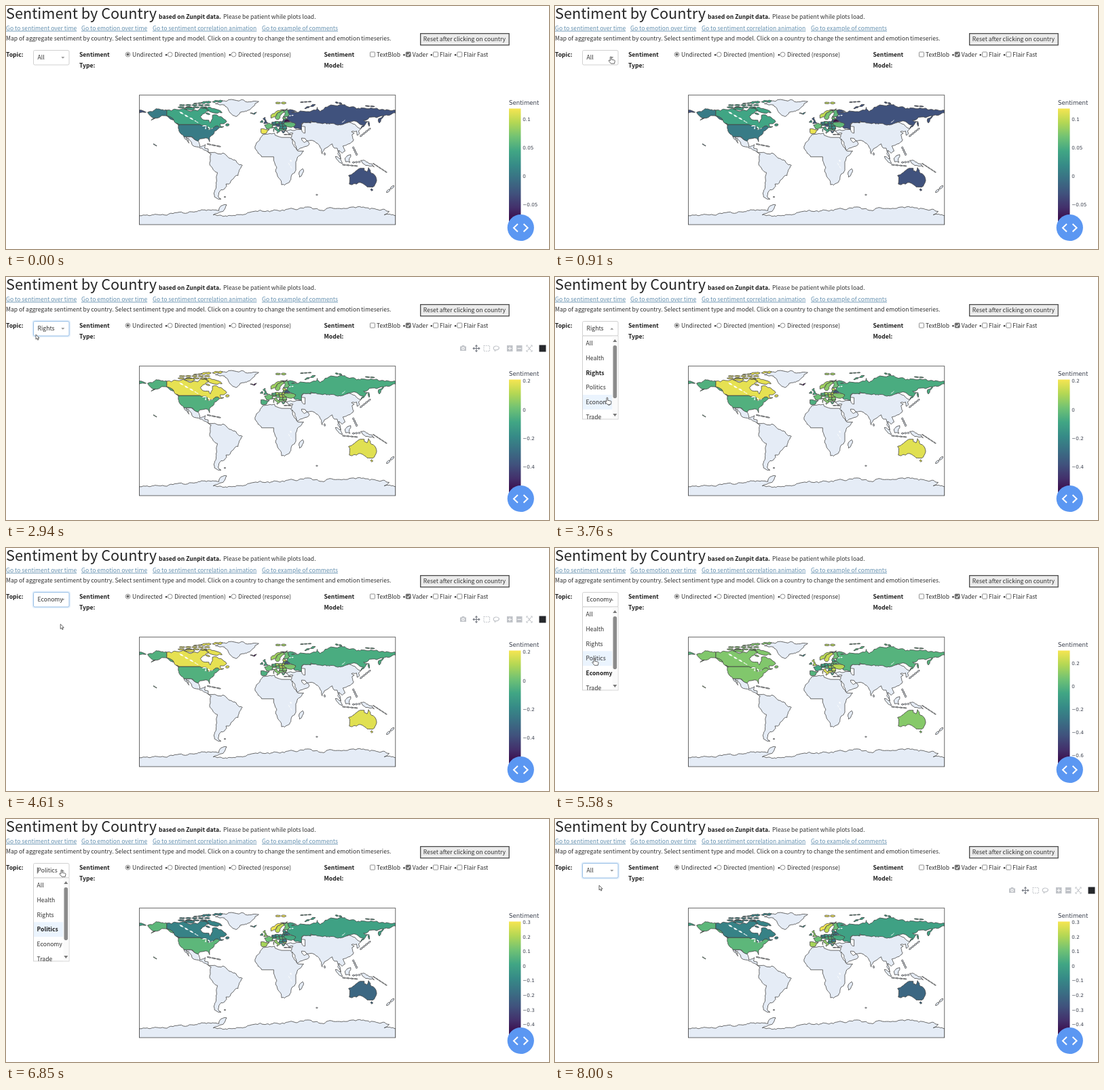
Recreate the animation shown at these times as an HTML page. Size 800 by 359 pixels, loop 8.03 s.

```html
<!DOCTYPE html>
<html lang="en">
<head>
<meta charset="utf-8">
<title>Sentiment by Country</title>
<style>
html, body { margin: 0; width: 100%; height: 100%; overflow: hidden; background: #fff; }
svg { display: block; width: 800px; height: 359px; }
text { font: 8.62px "Noto Sans CJK JP", "Noto Sans CJK SC", "Noto Sans CJK", "Noto Sans", sans-serif; fill: #303030; }
.b { font-weight: 700; fill: #1c1c1c; }
.link { fill: #6591b0; text-decoration: underline; }
.title { font-size: 21.7px; fill: #262626; }
.scale { font: 7.2px "DejaVu Sans", sans-serif; fill: #3b414e; }
.scale.head { font-size: 8.6px; }
.map path { stroke: #444; stroke-width: .8; stroke-linejoin: round; }
.map .lake { fill: #fff; stroke: none; }
.icons { fill: none; stroke: #c0c3c8; stroke-width: 1.1; }
</style>
</head>
<body>
<svg id="stage" viewBox="0 0 800 359"></svg>
<script>
const LOOP = 8030;
const topics = ['All', 'Health', 'Rights', 'Politics', 'Economy', 'Trade'];
const ROW = 21.7, MENU_TOP = 87.2;

// Key points of each coast as longitude and latitude; rough() adds the small bays
const land = {
  asia: '26 40 30 36 36 37 34 31 32 30 34 28 35 29 43 13 59 22 56 26 52 24 48 30 57 26 67 25 73 20 77 8 80 15 91 22 94 16 98 16 99 8 103 1 100 13 105 9 109 12 106 19 114 22 121 28 119 35 122 37 118 39 125 40 126 34 129 36 128 40 131 43 120 50 75 55 50 51 47 47 53 46 53 37 49 39 48 42 41 42 30 41',
  americas: '-117 32 -110 23 -114 31 -105 20 -94 16 -87 13 -79 8 -81 -5 -76 -14 -70 -18 -71 -30 -75 -47 -74 -52 -69 -55 -65 -55 -69 -51 -65 -42 -57 -37 -58 -34 -54 -34 -48 -27 -41 -22 -35 -8 -50 1 -61 9 -76 10 -83 10 -83 15 -88 16 -87 21 -91 19 -95 18 -97 26 -107 32',
  africa: '-6 35 10 37 11 34 20 31 32 31 37 20 43 12 51 12 40 -3 40 -15 35 -20 33 -28 28 -33 20 -35 12 -17 13 -10 9 -1 9 4 -8 4 -17 15 -16 21 -10 30',
  greenland: '-73 78 -60 82 -33 83 -12 81 -20 74 -24 70 -38 66 -44 60 -52 65 -55 70 -60 76',
  antarctica: '-180 -78 -150 -77 -103 -73 -68 -71 -67 -67 -57 -63 -62 -72 -76 -77 -45 -78 -18 -72 10 -70 38 -69 55 -66 72 -70 90 -67 135 -66 171 -72 164 -77 180 -78 180 -95 -180 -95',
  papua: '131 -1 147 -6 150 -10 138 -8',
  borneo: '109 2 117 7 116 -4 110 -3'
};

const points = s => s.match(/-?\d+ -?\d+/g).map(p => p.split(' ').map(Number));
const hash = (x, y) => { const v = Math.sin(x * 12.9898 + y * 78.233) * 43758.5453; return v - Math.floor(v); };

// A row of n long islands (or lakes) from one place to another
function chain(x1, y1, x2, y2, n, width) {
  const dx = (x2 - x1) / n, dy = (y2 - y1) / n, len = Math.hypot(dx, dy);
  return Array.from({ length: n }, (_, i) =>
    [[-.45, 0], [-.2, 1], [.25, .8], [.45, 0], [.2, -1], [-.25, -.8]].map(([u, v]) =>
      [x1 + dx * (i + .5 + u) - dy / len * v * width, y1 + dy * (i + .5 + u) + dx / len * v * width]));
}

const islands = [
  chain(50, -12, 45, -25, 1, 2.4),    // Madagascar
  chain(95, 5, 106, -6, 1, 1.7),      // Sumatra
  chain(105, -7, 127, -9, 4, .6),     // Sunda
  chain(119, -4, 131, -3, 3, 1),
  chain(120, 18, 126, 6, 4, 1.2),     // Philippines
  chain(130, 32, 145, 44, 4, 1),      // Japan
  chain(148, -5, 168, -18, 5, .5),
  chain(167, -46, 178, -36, 2, 1.3),  // New Zealand
  chain(-85, 22, -65, 18, 3, .6),     // Caribbean
  chain(23, 35, 34, 35, 2, .3),
  chain(-61, -52, -58, -52, 1, .5), chain(68, -49, 71, -49, 1, .6), chain(80, 10, 81, 6, 1, .9)
].flat();

const lakes = [
  chain(-92, 47, -84, 47, 1, .8), chain(-87, 42, -86, 46, 1, .8), chain(-84, 46, -80, 43, 1, .8),
  chain(-83, 41.8, -76, 44, 2, .5), chain(-124, 67, -96, 51, 4, .7), chain(104, 51, 110, 56, 1, .4),
  chain(30, 61, 37, 62, 2, .7), chain(32, 0, 34, -3, 1, 1), chain(29, -4, 35, -13, 2, .4)
].flat();

// Europe's middle: a net of small countries with uneven corners
function net() {
  const corner = (x, y) => [x + 2.4 * hash(x, y) - 1.2, y + 1.6 * hash(y, x) - .8];
  const cells = [];
  for (let y = 41; y < 58; y += 3)
    for (let x = 7; x < 27; x += 5)
      if (!(y < 45 && x < 16) && !(y > 52 && x < 21))
        cells.push({ polys: [[corner(x, y), corner(x + 5, y), corner(x + 5, y + 3), corner(x, y + 3)]] });
  return cells;
}

// tone: place on the colour scale (percent) in each data set; others are drawn by chance
const place = (outline, tone, ...extra) => ({ polys: [points(outline), ...extra.flat()], tone });
const places = [
  place('-125 48 -124 40 -117 32 -107 32 -103 29 -97 26 -95 29 -84 30 -81 25 -81 31 -76 35 -70 42 -67 45 -69 47 -75 45 -83 42 -84 46 -89 48 -95 49 -124 49', [43, 67, 78, 70],
    [points('-141 69 -156 71 -168 66 -163 60 -157 58 -163 55 -150 60 -141 61 -131 55 -135 59 -141 61')], chain(-160, 22, -155, 19, 2, .4)),
  place('-141 69 -128 70 -98 68 -94 72 -82 69 -94 60 -92 57 -82 55 -80 51 -77 57 -77 62 -65 60 -57 53 -66 50 -65 46 -61 46 -67 45 -69 47 -75 45 -83 42 -84 46 -89 48 -95 49 -124 49 -131 55 -135 59 -141 61', [62, 97, 78, 46],
    chain(-90, 73, -62, 65, 1, 3), chain(-118, 71, -101, 71, 1, 2), chain(-94, 79, -62, 82, 2, 1.7), chain(-124, 76, -80, 76, 5, .9),
    chain(-126, 73, -84, 73, 4, .9), chain(-104, 78, -92, 79, 2, .6), chain(-59, 48, -53, 49, 1, 1.6), chain(-128, 51, -123, 48, 1, .5), chain(-87, 65, -80, 63, 1, 1)),
  place('28 60 31 63 29 69 41 67 34 66 44 66 46 68 68 69 70 73 74 67 81 73 104 77 113 74 130 71 160 70 180 69 180 65 163 60 157 51 156 57 163 61 143 59 135 55 141 53 131 43 135 48 125 53 108 50 80 51 61 54 61 51 48 50 48 42 37 45 40 50 32 53 28 56', [25, 65, 68, 60],
    [points('-180 69 -170 66 -180 65')], chain(52, 71, 68, 77, 2, 1), chain(46, 80, 62, 81, 3, .5), chain(95, 80, 105, 78, 2, .9), chain(137, 75, 151, 74, 2, .6), chain(142, 54, 143, 46, 1, .7)),
  place('114 -22 122 -18 130 -12 136 -12 136 -15 140 -17 142 -11 146 -19 153 -26 150 -37 140 -38 131 -32 118 -35 115 -34', [25, 96, 79, 34], chain(145, -41, 148, -43, 1, 1.3)),
  place('-24 65 -15 66 -18 63', [45, 3, 50, 50]),
  ...net(),
  place('5 58 5 62 14 68 28 71 20 69 12 61', [90, 84, 88, 99], chain(11, 79, 27, 79, 2, 1.3)),
  place('11 59 14 65 22 69 24 66 18 61 16 56 13 56', [76, 80, 92, 90]),
  place('21 69 28 70 31 63 28 60 22 60 25 65', [70, 74, 75, 74]),
  place('-5 50 1 51 -2 55 -3 59 -6 57 -3 54'),
  place('-10 52 -7 55 -6 52'),
  place('-4 48 2 51 8 49 7 44 -1 43'),
  place('-9 43 3 42 -1 37 -6 36 -9 38', [98, 66, 68, 85]),
  place('7 45 13 46 14 43 18 40 16 38 10 44', null, chain(13, 38, 15, 37, 1, .5), chain(9, 43, 9, 39, 2, .5)),
  place('20 40 26 41 24 38 22 37'),
  place('23 49 24 52 34 52 40 49 34 45 28 46'),
  place('24 52 24 54 28 56 32 53', [1, 30, 70, 40])
];

// Data sets: start, first tick value, step, y of zero, gap, tick count, usual tone and spread
const scales = [
  { at: 0, top: .1, step: .05, zero: 251, gap: 42, n: 4, mean: .5, spread: .25 },
  { at: 2350, top: .2, step: .2, zero: 196, gap: 42.3, n: 4, mean: .76, spread: .15 },
  { at: 4700, top: .2, step: .2, zero: 204, gap: 34.1, n: 5, mean: .76, spread: .2 },
  { at: 6250, top: .3, step: .1, zero: 217, gap: 21.6, n: 8, mean: .62, spread: .2 }
];

// Each visit to the menu: when it opens and closes, the topic, where the pointer picks it
const visits = [
  { open: 1150, close: 1850, topic: 2, x: 66, y: 147 },
  { open: 3200, close: 4200, topic: 4, x: 77, y: 178 },
  { open: 5060, close: 5900, topic: 3, x: 58, y: 163 },
  { open: 6700, close: 7500, topic: 0, x: 65, y: 98 }
];
const ENTER = 250;
const track = [
  [ENTER, 120, 52], [2750, 44, 85], [2940, 44, 85], [LOOP, 65, 98],
  ...visits.flatMap(v => [[v.open - 200, 82, 75], [v.open + 200, 82, 75], [v.open + 430, v.x, v.y], [v.close + 50, v.x, v.y]])
].sort((a, b) => a[0] - b[0]);

// Viridis, slightly greyed
const viridis = ['440154', '472d7b', '3b528b', '2c728e', '21918c', '28ae80', '5ec962', 'addc30', 'fde725'].map(hex => {
  const c = [0, 2, 4].map(i => parseInt(hex.slice(i, i + 2), 16));
  const grey = .21 * c[0] + .72 * c[1] + .07 * c[2];
  return c.map(v => grey + (v - grey) * .76);
});
function shade(v) {
  const p = Math.max(0, Math.min(v, .9999)) * 8, i = Math.floor(p);
  return `rgb(${viridis[i].map((c, k) => Math.round(c + (viridis[i + 1][k] - c) * (p - i)))})`;
}

// Splits a side with a seeded bend; meridians and parallels stay straight
function rough(a, b) {
  const dx = b[0] - a[0], dy = b[1] - a[1], len = Math.hypot(dx, dy);
  if (len < 3.5 || !dx || !dy) return [a];
  const x = (a[0] + b[0]) / 2, y = (a[1] + b[1]) / 2;
  const bend = (hash(x, y) - .5) * Math.min(.36, 3.2 / len) * Math.sign(dx);
  const mid = [x - dy * bend, y + dx * bend];
  return [...rough(a, mid), ...rough(mid, b)];
}
const outline = poly => 'M' + poly.flatMap((p, i) => rough(p, poly[(i + 1) % poly.length]))
  .map(([x, y]) => `${(385 + x * 1.05).toFixed(1)} ${(227 - y * 1.06).toFixed(1)}`).join('L') + 'Z';

const text = (x, y, s, cls = '') => `<text x="${x}" y="${y}" class="${cls}">${s}</text>`;
const dot = x => `<circle cx="${x}" cy="72.3" r="1.2" fill="#333"/>`;
const links = [[0, 'sentiment over time'], [111, 'emotion over time'], [216, 'sentiment correlation animation'], [377, 'example of comments']];
const radios = [[179.5, 'Undirected'], [241.7, 'Directed (mention)'], [335.5, 'Directed (response)']];
const checks = [[536, 'TextBlob'], [588.7, 'Vader'], [629, 'Flair'], [664.3, 'Flair Fast']];

const header =
  text(0, 19.3, 'Sentiment by Country', 'title') + text(225, 19.3, 'based on Zunpit data.', 'b') +
  text(320, 19.3, 'Please be patient while plots load.') +
  links.map(([x, s]) => text(x, 35.7, 'Go to ' + s, 'link')).join('') +
  text(0, 50.5, 'Map of aggregate sentiment by country. Select sentiment type and model. Click on a country to change the sentiment and emotion timeseries.') +
  '<rect x="610.7" y="40.7" width="130.5" height="17" fill="#ececec" stroke="#3c3c3c" stroke-width="1.2"/>' +
  text(614.8, 52.3, 'Reset after clicking on country') +
  text(0, 75.4, 'Topic:', 'b') +
  [[108, 'Type:'], [468.5, 'Model:']].map(([x, s]) => text(x, 75.4, 'Sentiment', 'b') + text(x, 90.6, s, 'b')).join('') +
  radios.map(([x, s], i) => `<circle cx="${x}" cy="71.6" r="3.4" fill="#fff" stroke="#777" stroke-width=".8"/>` +
    (i ? dot(x - 5.6) : `<circle cx="${x}" cy="71.6" r="2" fill="#666"/>`) + text(x + 6.5, 75.4, s)).join('') +
  checks.map(([x, s], i) => `<rect x="${x + .5}" y="68" width="7" height="7" rx="1" fill="${i === 1 ? '#6b6b6b' : '#fff'}" stroke="#777" stroke-width=".8"/>` +
    (i ? dot(x - 2.2) : '') +
    (i === 1 ? `<path d="M${x + 2} 71.6l1.6 1.7 2.8-3.6" fill="none" stroke="#fff" stroke-width="1.1"/>` : '') +
    text(x + 10, 75.4, s)).join('');

const map = `<clipPath id="frame"><rect x="196" y="131.5" width="378" height="191.5"/></clipPath>
  <g class="map" clip-path="url(#frame)">
  ${[...Object.values(land).map(points), ...islands].map(p => `<path d="${outline(p)}" fill="#e5ecf6"/>`).join('')}
  ${places.map(p => `<path class="place" d="${p.polys.map(outline).join('')}"/>`).join('')}
  ${lakes.map(p => `<path class="lake" d="${outline(p)}"/>`).join('')}</g>
  <rect x="196.4" y="131.7" width="377.4" height="191.3" fill="none" stroke="#444" stroke-width=".8"/>`;

const legend = `<linearGradient id="ramp" x1="0" y1="1" x2="0" y2="0">
  ${viridis.map((c, i) => `<stop offset="${i / 8}" stop-color="${shade(i / 8)}"/>`).join('')}</linearGradient>
  <rect x="741" y="151.5" width="17.5" height="167" fill="url(#ramp)"/>
  ${text(741, 146.3, 'Sentiment', 'scale head')}<g id="ticks"></g>
  <circle cx="758.3" cy="327.5" r="19.6" fill="#5b97f2"/>
  <path d="M754 322l-6 5.7 6 5.7M762.6 322l6 5.7-6 5.7" fill="none" stroke="#fff" stroke-width="2"/>`;

const tools = `<g id="tools" class="icons">
  <path d="M669 102.5h2l1-1.5h3l1 1.5h2v6.5h-9z" fill="#c0c3c8" stroke="none"/><circle cx="673.5" cy="105.6" r="1.7" stroke="#fff"/>
  <path d="M688.5 105.5h9M693 101v9M691.5 102.5l1.5-1.8 1.5 1.8M691.5 108.5l1.5 1.8 1.5-1.8M690 104l-1.8 1.5 1.8 1.5M696 104l1.8 1.5-1.8 1.5" stroke="#777b84"/>
  <rect x="704" y="101.5" width="8.5" height="8" stroke-dasharray="1.7 1.2"/>
  <path d="M720 108c-3-2-2-6 2-6s6 3 3 5-6 0-5 1 1 1 0 2"/>
  <path d="M738 101h8.500v9H738zM752 101h8.500v9H752z" fill="#c0c3c8" stroke="none"/>
  <path d="M739.5 105.5h5.5M742.2 102.7v5.6M753.5 105.5h5.5" stroke="#fff"/>
  <path d="M767 103v-2h2M773 101h2v2M775 108v2h-2M769 110h-2v-2M768.5 102.5l5 6M773.5 102.5l-5 6"/>
  <rect x="785.5" y="100.500" width="10" height="10" fill="#26282c" stroke="none"/></g>`;

const dropdown = `<rect id="halo" x="39.5" y="64.5" width="54.5" height="23.5" rx="3" fill="none" stroke="#e3effb" stroke-width="2"/>
  <rect id="box" x="40.5" y="65.5" width="52.5" height="21.5" rx="2" fill="#fff" stroke-width=".9"/>
  <text id="value" x="46.5" y="79"></text><path id="caret" d="M46.3 71.5v9" stroke="#333" stroke-width=".8"/>
  <path id="arrow" fill="#999"/>
  <clipPath id="fold"><rect x="40" y="87" width="54" height="123"/></clipPath>
  <g id="menu"><rect x="40.5" y="87" width="52.5" height="123" fill="#fff" stroke="#ccc" stroke-width=".9"/>
  <rect id="hover" x="41" width="43.5" height="${ROW}" fill="#ebf4fe"/>
  <g clip-path="url(#fold)">${topics.map((s, i) => text(45.5, (101.2 + i * ROW).toFixed(1), s, 'item')).join('')}</g>
  <rect x="84.5" y="87.5" width="8" height="122" fill="#fafafa"/>
  <rect x="85.5" y="101" width="5.6" height="78" rx="2.8" fill="#8b8b8b"/>
  <path d="M85.3 96h6l-3-4zM85.3 202h6l-3 4z" fill="#777"/></g>`;

const pointers = `<g stroke="#333" stroke-width=".75" fill="#fff" stroke-linejoin="round">
  <path id="point" d="M0 0v7l1.6-1.5 1.1 2.6 1.3-.6-1.100-2.400h2.200z"/>
  <path id="hand" d="M-1 1c0-1.300 1.800-1.300 1.800 0v3.300l4 .8c1 .2 1.300 1 1.100 2l-.7 3.200h-5L-3 6.500c-.6-1 .6-1.800 1.300-1l.7.7z"/></g>`;

const stage = document.getElementById('stage');
stage.innerHTML = header + map + legend + tools + dropdown + pointers;
const el = id => document.getElementById(id);
const show = (node, on) => node.setAttribute('visibility', on ? 'visible' : 'hidden');
const items = [...stage.querySelectorAll('.item')];
const shapes = [...stage.querySelectorAll('.place')];
let shown = -1;

function paint(k) {
  if (k === shown) return;
  shown = k;
  const { top, step, zero, gap, n, mean, spread } = scales[k];
  shapes.forEach((s, i) => {
    const tone = places[i].tone;
    s.setAttribute('fill', shade(tone ? tone[k] / 100 : mean + spread * (2 * hash(i, k + 1) - 1)));
  });
  el('ticks').innerHTML = Array.from({ length: n }, (_, i) => {
    const steps = Math.round(top / step) - i;
    const label = String(+Math.abs(steps * step).toFixed(2));
    return text(761.3, (zero - steps * gap + 2.7).toFixed(1), (steps < 0 ? '−' : '') + label, 'scale');
  }).join('');
}

function pointerAt(t) {
  const i = Math.max(1, track.findIndex(p => p[0] >= t));
  const a = track[i - 1], b = track[i];
  const u = Math.max(0, (t - a[0]) / (b[0] - a[0])), ease = u * u * (3 - 2 * u);
  return [1, 2].map(k => a[k] + (b[k] - a[k]) * ease);
}

function draw(t) {
  const [x, y] = pointerAt(t);
  const open = visits.find(v => t >= v.open && t < v.close);
  const picked = visits.reduce((topic, v) => t >= v.close ? v.topic : topic, 0);
  const focus = t >= visits[0].close && !open;
  const inBox = x > 40 && x < 93 && y > 65 && y < 84.5;

  paint(scales.reduce((k, s, i) => t >= s.at ? i : k, 0));
  show(el('tools'), focus && y >= 84.9);
  show(el('halo'), focus);
  el('box').setAttribute('stroke', focus ? '#8fb9e4' : '#ccc');
  el('value').textContent = topics[picked];
  el('arrow').setAttribute('d', open ? 'M81.3 77.800h5l-2.500-2.800z' : 'M81.3 75h5l-2.500 2.800z');
  show(el('caret'), open && (t - open.open) % 1000 < 500);
  show(el('menu'), open);
  const row = y > MENU_TOP ? Math.floor((y - MENU_TOP) / ROW) : picked;
  el('hover').setAttribute('y', MENU_TOP + row * ROW);
  items.forEach((n, i) => n.setAttribute('class', i === picked ? 'item b' : 'item'));

  const hand = open || inBox, seen = t >= ENTER;
  show(el('hand'), seen && hand);
  show(el('point'), seen && !hand);
  for (const id of ['hand', 'point']) el(id).setAttribute('transform', `translate(${x.toFixed(1)} ${y.toFixed(1)})`);
}

function tick() {
  draw(performance.now() % LOOP);
  requestAnimationFrame(tick);
}
tick();
</script>
</body>
</html>
```
